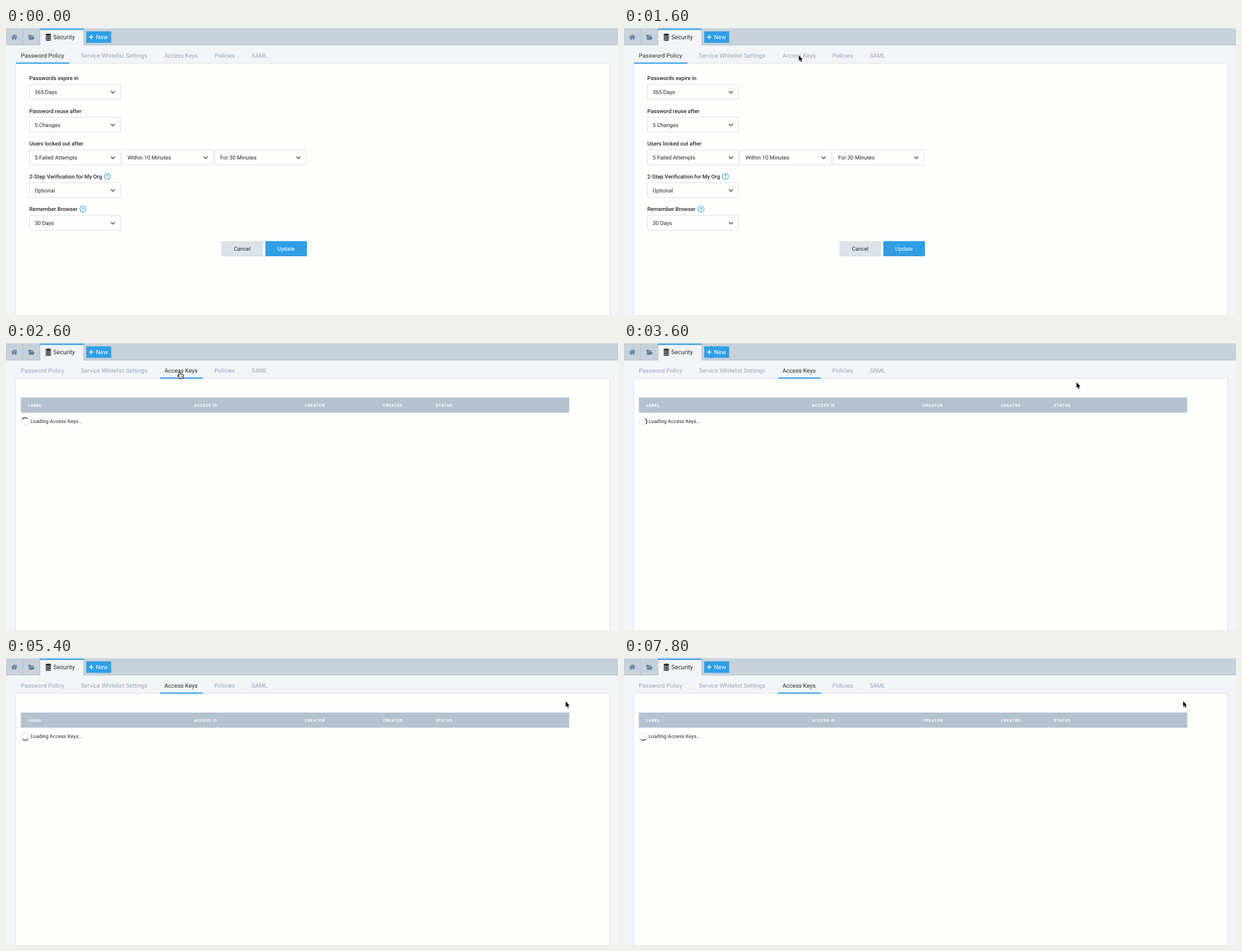
An HTML page with a canvas that plays this animation: 1091 px wide and 513 px high, repeating every 8000 ms.

```html
<!DOCTYPE html>
<html lang="en">
<head>
<meta charset="utf-8">
<title>Security settings</title>
<style>
  html, body { margin: 0; width: 100%; height: 100%; overflow: hidden; background: #f3f4f7; }
  canvas { display: block; }
</style>
</head>
<body>
<canvas id="stage" width="1091" height="513"></canvas>
<script>
const ctx = document.getElementById('stage').getContext('2d');
const LOOP = 8000;
const BLUE = '#2f9fe5', INK = '#26292e', MUTED = '#92a7be', ICON = '#5f7f9e', PAPER = '#fefefd';
const SELECT_TIME = 2300, LOAD_TIME = 2600, HAND_TIME = 1800, SPIN = 800;

const tabs = [
  ['Password Policy', 26.5, 18, 113], ['Service Whitelist Settings', 133.5],
  ['Access Keys', 282.5, 274.5, 351], ['Policies', 371.5], ['SAML', 438]
];
const fields = [
  ['Passwords expire in', ['365 Days']],
  ['Password reuse after', ['5 Changes']],
  ['Users locked out after', ['5 Failed Attempts', 'Within 10 Minutes', 'For 30 Minutes']],
  ['2-Step Verification for My Org', ['Optional'], 180.7],
  ['Remember Browser', ['30 Days'], 137.2]
];
const columns = [['LABEL', 39.5], ['ACCESS ID', 335], ['CREATOR', 532.5], ['CREATED', 672], ['STATUS', 766]];

// Cursor tip: time, x, y
const cursorPath = [
  [1400, 330, 92], [1600, 311.7, 49], [1850, 309.5, 51.5], [2850, 309.5, 51.5],
  [4000, 997.7, 77.5], [7300, 997.7, 77.5], [7500, 996.7, 77.2]
];

function rect(x, y, w, h, color) {
  ctx.fillStyle = color;
  ctx.fillRect(x, y, w, h);
}

function text(str, x, y, size, color, weight = 400, align = 'left', spacing = 0) {
  ctx.font = `${weight} ${size}px Roboto, sans-serif`;
  ctx.letterSpacing = spacing + 'px';
  ctx.textRendering = 'geometricPrecision';
  ctx.textAlign = align;
  ctx.fillStyle = color;
  ctx.fillText(str, x, y);
}

function shape(points, fill, stroke, width = 1) {
  ctx.beginPath();
  points.forEach(([x, y]) => ctx.lineTo(x, y));
  if (fill) {
    ctx.closePath();
    ctx.fillStyle = fill;
  }
  if (stroke) {
    ctx.strokeStyle = stroke;
    ctx.lineWidth = width;
    ctx.stroke();
  }
  if (fill) ctx.fill();
}

function arc(x, y, r, from, to, color, width) {
  ctx.beginPath();
  ctx.arc(x, y, r, from, to);
  ctx.strokeStyle = color;
  ctx.lineWidth = width;
  ctx.stroke();
}

function homeIcon() {
  shape([[9.3, 17], [14.6, 12.2], [20, 17]], null, ICON, 1.4);
  rect(17.3, 12, 1.5, 3, ICON);
  shape([[11, 17.2], [14.6, 13.9], [18.3, 17.2], [18.3, 21], [15.7, 21],
    [15.7, 18.2], [13.6, 18.2], [13.6, 21], [11, 21]], ICON);
}

function folderIcon() {
  shape([[40, 19.6], [40, 12], [43.8, 12], [44.8, 13.2], [48.8, 13.2], [48.8, 15.2], [42.3, 15.2]], ICON);
  shape([[40.3, 21], [42.6, 16], [51.2, 16], [49, 21]], ICON);
}

function databaseIcon() {
  ctx.fillStyle = INK;
  for (let i = 3; i >= 0; i--) {
    const y = 12 + i * 3;
    ctx.beginPath();
    ctx.ellipse(75.5, y, 5, 1.9, 0, 0, Math.PI * 2);
    ctx.fill();
    if (!i) continue;
    ctx.beginPath();
    ctx.ellipse(75.5, y - 2.1, 5.2, 1.9, 0, 0, Math.PI);
    ctx.strokeStyle = '#f3f4f7';
    ctx.lineWidth = 0.9;
    ctx.stroke();
  }
}

function topBar() {
  rect(0, 0, 1091, 31, '#c6d1da');
  rect(0, 0, 1091, 1, '#e2e8ed');
  rect(0, 30, 1091, 1, '#b7c4cf');
  rect(29.5, 1, 1, 30, '#afbcc8');
  rect(60, 1, 78, 31, '#f3f4f7');
  rect(60, 1, 1, 30, '#afbcc8');
  rect(138, 3, 1, 28, '#b4c0cb');
  rect(60.5, 1, 78, 2.4, BLUE);
  homeIcon();
  folderIcon();
  databaseIcon();
  text('Security', 84.3, 20.2, 10.8, INK);
  ctx.beginPath();
  ctx.roundRect(143, 6, 44.5, 20.5, 1);
  ctx.fillStyle = BLUE;
  ctx.fill();
  rect(148, 15.5, 8, 1.5, '#fff');
  rect(151.25, 12.2, 1.5, 8, '#fff');
  text('New', 160.3, 20.2, 10.8, '#fff');
}

function panel(active) {
  ctx.save();
  ctx.shadowColor = 'rgba(60,80,100,.16)';
  ctx.shadowBlur = 3;
  rect(18, 64, 1057.5, 460, PAPER);
  ctx.restore();
  tabs.forEach(([name, x, from, to], i) => {
    text(name, x, 53.4, 10.5, i === active ? INK : MUTED);
    if (i === active) rect(from, 61.6, to - from, 2.2, BLUE);
  });
}

function select(label, x, y) {
  ctx.beginPath();
  ctx.roundRect(x, y, 162.5, 26.5, 1);
  ctx.fillStyle = PAPER;
  ctx.fill();
  ctx.strokeStyle = '#dcdddf';
  ctx.lineWidth = 1;
  ctx.stroke();
  text(label, x + 9.5, y + 17.2, 9.75, INK);
  const cx = x + 149, cy = y + 13.7;
  shape([[cx - 3.6, cy - 1.9], [cx, cy + 1.8], [cx + 3.6, cy - 1.9]], null, '#686b70', 1.9);
}

function help(x, y) {
  arc(x, y, 5.4, 0, Math.PI * 2, '#2c9ed0', 1.1);
  text('?', x, y + 3.2, 8.6, '#2c9ed0', 700, 'center');
}

function button(label, x, fill, color, edge) {
  rect(x, 381, 74.2, 27, fill);
  rect(x, 407, 74.2, 1, edge);
  text(label, x + 37, 398.2, 9.75, color, 400, 'center');
}

function policyForm() {
  fields.forEach(([label, values, helpX], i) => {
    const y = 58.5 * i;
    text(label, 41.5, 93.4 + y, 9.75, INK, 500);
    values.forEach((value, k) => select(value, 41.5 + 165.4 * k, 101 + y));
    if (helpX) help(helpX, 89.7 + y);
  });
  button('Cancel', 384, '#dde2e8', INK, '#d0d6dd');
  button('Update', 462.3, BLUE, '#fff', '#4a8fc0');
}

function keyTable(t) {
  rect(26.5, 97.5, 977.5, 27, '#b4c1cf');
  columns.forEach(([name, x]) => text(name, x, 114, 7.1, '#fff', 700, 'left', 0.7));
  arc(34, 140.3, 6.8, 0, Math.PI * 2, '#d9dadb', 1);
  const angle = (t - LOAD_TIME) / SPIN * Math.PI * 2 - Math.PI * 0.53;
  arc(34, 140.3, 6.8, angle - Math.PI / 4, angle + Math.PI / 4, '#36383b', 1.5);
  text('Loading Access Keys...', 43.7, 143.4, 9, INK);
}

function cursorAt(t) {
  const next = cursorPath.findIndex(p => p[0] > t);
  if (next < 0) return cursorPath[cursorPath.length - 1].slice(1);
  const [t0, x0, y0] = cursorPath[next - 1], [t1, x1, y1] = cursorPath[next];
  const u = (t - t0) / (t1 - t0), e = u * u * (3 - 2 * u);
  return [x0 + (x1 - x0) * e, y0 + (y1 - y0) * e];
}

function arrow() {
  shape([[0, 0], [0, 10], [2.3, 8], [4, 11.8], [5.7, 11], [4.1, 7.4], [7, 7.2]], '#111', '#fff', 1.5);
}

function hand() {
  ctx.beginPath();
  ctx.moveTo(-1.3, 7);
  ctx.lineTo(-1.3, 1);
  ctx.quadraticCurveTo(0, -1, 1.1, 1);
  ctx.lineTo(1.3, 4.2);
  ctx.quadraticCurveTo(2.6, 3.2, 3.4, 4.7);
  ctx.quadraticCurveTo(4.6, 3.9, 5.4, 5.3);
  ctx.quadraticCurveTo(7.3, 4.9, 7.2, 7);
  ctx.quadraticCurveTo(7.1, 10, 5.7, 12.1);
  ctx.lineTo(0.2, 12.1);
  ctx.quadraticCurveTo(-1, 9.8, -3.3, 7.2);
  ctx.quadraticCurveTo(-3, 5.2, -1.3, 7);
  ctx.closePath();
  ctx.fillStyle = '#fff';
  ctx.fill();
  ctx.strokeStyle = '#111';
  ctx.lineWidth = 1.1;
  ctx.stroke();
  [1.6, 3.4, 5.1].forEach(x => rect(x - 0.3, 7.2, 0.7, 2.8, '#333'));
}

function cursor(t) {
  if (t < cursorPath[0][0]) return;
  const [x, y] = cursorAt(t);
  ctx.save();
  ctx.translate(x, y);
  ctx.lineJoin = 'round';
  const overTab = t >= HAND_TIME && x < 351;
  (overTab ? hand : arrow)();
  ctx.restore();
}

function draw(now) {
  const t = now % LOOP;
  rect(0, 0, 1091, 513, '#f3f4f7');
  topBar();
  panel(t < SELECT_TIME ? 0 : 2);
  if (t < LOAD_TIME) policyForm();
  else keyTable(t);
  cursor(t);
  requestAnimationFrame(draw);
}
requestAnimationFrame(draw);
</script>
</body>
</html>
```
